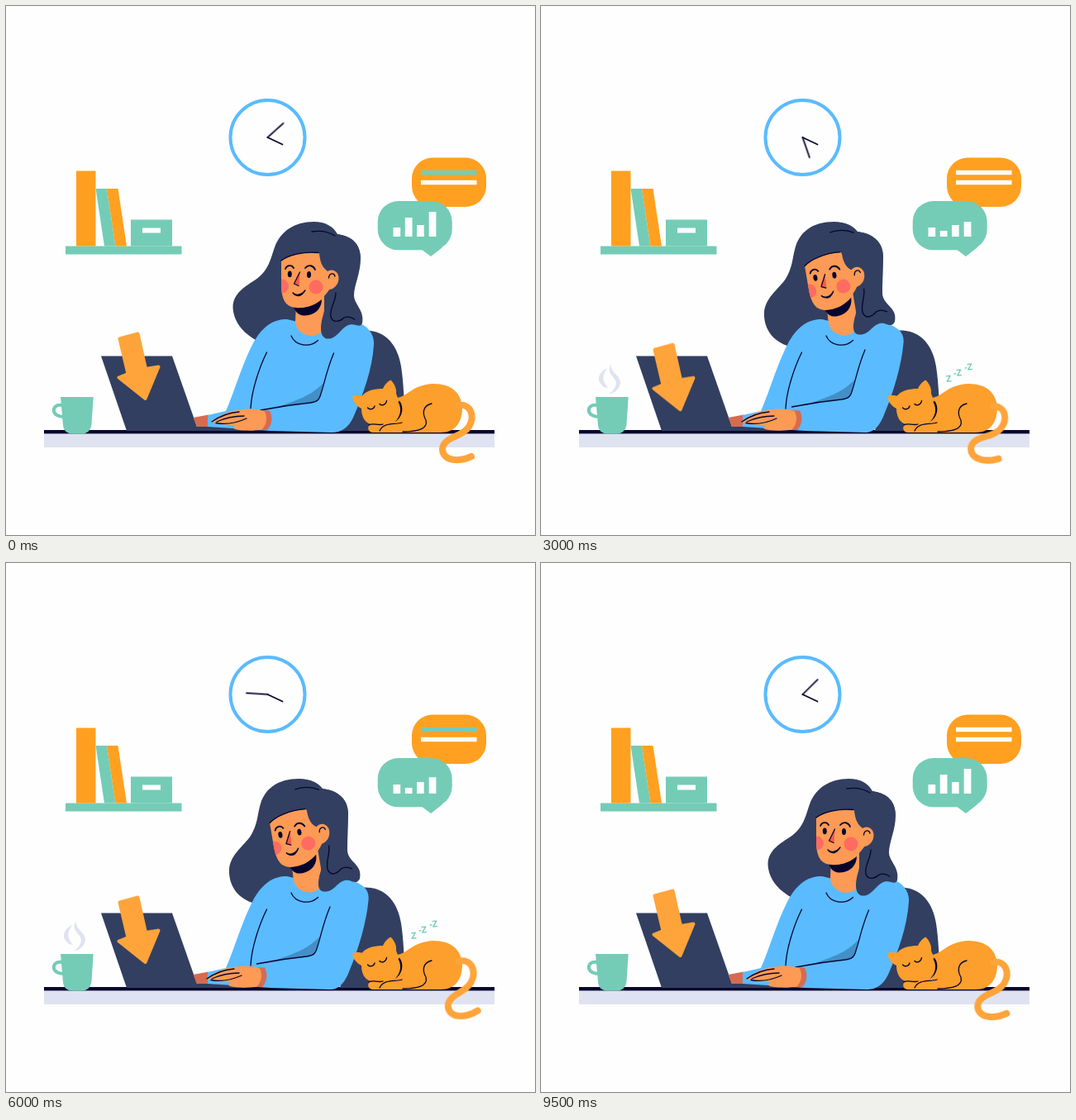
Animation of 640x640 px, one loop 9570 ms. Source, as an HTML page:

```html
<!DOCTYPE html>
<html lang="en">
<head>
<meta charset="utf-8">
<title>Working at a desk</title>
<style>
@property --lean { syntax: "<number>"; inherits: true; initial-value: 0; }

:root {
  --loop: 9570ms;
  --half: 4785ms;
  --ink: #06052f;
  --navy: #323f61;
  --blue: #5abbff;
  --green: #74ccb6;
  --orange: #ffa020;
  --amber: #ffa43b;
  --skin: #fd9a55;
  --shade: #d66b50;
  --blush: #ff6b60;
  --mist: #dfe3f1;
}
html, body { margin: 0; width: 100%; height: 100%; overflow: hidden; background: #fefefe; }
svg { display: block; width: 100%; height: 100%; animation: lean var(--loop) infinite; }

.ink { fill: var(--ink); }
.navy { fill: var(--navy); }
.blue { fill: var(--blue); }
.green { fill: var(--green); }
.orange { fill: var(--orange); }
.skin { fill: var(--skin); }
.shade { fill: var(--shade); }
.blush { fill: var(--blush); }
.mist { fill: var(--mist); }
.white { fill: #fefefe; }
.line { fill: none; stroke: var(--ink); stroke-width: 1.3; stroke-linecap: round; stroke-linejoin: round; }
.thick { stroke-width: 1.8; }

/* --lean: 0 sits back, 1 leans to the screen */
@keyframes lean {
  0% { --lean: 0; animation-timing-function: ease-in-out; }
  18%, 62.4% { --lean: 1; animation-timing-function: ease-in-out; }
  100% { --lean: 0; }
}
.head { transform-origin: 365px 395px; transform: rotate(calc(var(--lean) * -9.5deg)); }
.hand { transform: translateX(calc(var(--lean) * -6px)); }
.elbow { transform: translate(calc(var(--lean) * -4.5px), calc(var(--lean) * -4px)); }

.morph { animation: var(--loop) infinite ease-in-out; }
.torso { animation-name: torso; }
.hair { animation-name: hair; }
.lock { animation-name: lock; }
@keyframes torso {
  0%, 100% { d: path("M244 495L266 490C276 468 286 432 300 406C312 386 324 379 340 379L386 390C396 388 412 380 424 382C438 387 446 397 445 410C443 440 432 470 420 498C414 510 406 516 394 516L320 514L244 509Z"); }
  18%, 62.4% { d: path("M244 495L266 490C276 468 286 432 300 406C312 386 324 379 340 379L386 390C396 388 408 380 418 384C433 389 440 396 438.5 408C436 436 426 468 416 492C410 508 403 516 392 516L320 514L244 509Z"); }
}
@keyframes hair {
  0%, 100% { d: path("M304 405C287 396 275 382 274.5 364C275 347 290 339 302 331C318 320 320 306 325 292C332 272 350 261 372 261C387 261 396 267 401 276C421 279 429 290 429 306L390 380L340 400Z"); }
  18%, 62.4% { d: path("M301 412C280 406 269 390 270 370C272 352 288 342 296 330C305 315 304 304 308 291C314 272 330 261 354 261C369 261 378 266 383 273C405 276 414 288 414 304L386 375L340 400Z"); }
}
@keyframes lock {
  0%, 100% { d: path("M376 285L379 299C380 312 384 318 391 322L393 343C386 352 387 362 384 373C380 386 379 400 388 402.5C401 404 405 388 416 385.5C423 384 428 390 431 384C434 368 421 361 421 350C421 338 429 323 429 306C429 290 421 279 401 276Z"); }
  18%, 62.4% { d: path("M360 288L364 300C366 313 371 318 379 321L386 340C383 350 383 362 381 372C377 385 376 396 384 397.5C397 399 400 386 410 384C418 382 423 391 428 382C432 364 413 362 413 347C413 332 414 320 414 304C414 288 405 276 383 273Z"); }
}

.mouth { stroke: var(--ink); stroke-width: 1.4; stroke-linejoin: round; animation: mouth var(--loop) infinite ease-in-out; }
@keyframes mouth {
  0%, 62%, 97%, 100% { d: path("M347 347C350 351 358 350 362 344C358 350.5 355 351 353 350.5C350 350 348 348.5 347 347Z"); }
  68%, 88% { d: path("M346 348C352 350 358 348 361.5 344C361 351 357 356 353 356C349 355 347 352 346 348Z"); }
}

.minute { transform-origin: 316.5px 159px; animation: minute var(--loop) infinite linear; }
@keyframes minute { from { transform: rotate(48deg); } to { transform: rotate(408deg); } }

.arrow { fill: var(--amber); stroke: var(--amber); stroke-width: 4; stroke-linejoin: round; animation: bob var(--half) infinite cubic-bezier(.37, 0, .63, 1); }
@keyframes bob { 50% { transform: translateY(15.6px); } }

.tail { fill: none; stroke: var(--amber); stroke-width: 8; stroke-linecap: round; transform-origin: 539px 481px; animation: sway var(--loop) infinite linear; }
@keyframes sway {
  0%, 100% { transform: rotate(0); }
  22% { transform: rotate(11deg); }
  40.3% { transform: rotate(5.5deg); }
  53% { transform: rotate(-2deg); }
  62.7% { transform: rotate(-7deg); }
  73% { transform: rotate(-11deg); }
  85% { transform: rotate(-6deg); }
}

.row { animation: var(--half) infinite step-end; }
.row1 { animation-name: row1; }
.row2 { animation-name: row2; }
@keyframes row1 { 0% { fill: var(--green); } 27%, 100% { fill: #fefefe; } }
@keyframes row2 { 0%, 54%, 100% { fill: #fefefe; } 27% { fill: var(--green); } }

.bar { transform-origin: 0 279px; animation: var(--loop) infinite ease-in-out; }
.bar2 { animation-name: bar2; }
.bar4 { animation-name: bar4; }
@keyframes bar2 { 0%, 15%, 76%, 100% { transform: none; } 26%, 65% { transform: scaleY(.304); } }
@keyframes bar4 { 0%, 10%, 70%, 100% { transform: none; } 20%, 60% { transform: scaleY(.6); } }

.rise { animation: rise var(--half) infinite ease-in-out; }
@keyframes rise {
  0% { transform: translateY(40px); }
  27%, 76% { transform: none; }
  98%, 100% { transform: translateY(-40px); }
}
.pass { animation: pass var(--half) infinite linear; }
@keyframes pass {
  0%, 8% { transform: translateX(-40px); }
  29%, 68% { transform: none; }
  89%, 100% { transform: translateX(40px); }
}
.snore { font: 700 11px "Open Sans", Inter, sans-serif; }
</style>
</head>
<body>
<svg viewBox="0 0 640 640">
  <defs>
    <clipPath id="steam"><rect class="rise" x="60" y="431" width="50" height="40"/></clipPath>
    <clipPath id="snore"><rect class="pass" x="488" y="420" width="40" height="45"/></clipPath>
    <clipPath id="face"><path d="M333 308C345 300 362 297 379 299L392 342C386 351 378 359 368 362C356 367 345 366 339 360C334 354 333 345 333 335Z"/></clipPath>
  </defs>

  <!-- clock -->
  <circle cx="316.5" cy="159" r="45" fill="#fefefe" stroke="#5abbff" stroke-width="4"/>
  <path class="line thick" d="M316.500 159L334.500 167.500"/>
  <path class="line thick minute" d="M316.500 159V133.500"/>

  <!-- shelf -->
  <rect class="green" x="72" y="290.5" width="140.5" height="10"/>
  <rect class="orange" x="85" y="199.5" width="23.5" height="91"/>
  <path class="green" d="M108.500 221H122L132.500 290.500H119Z"/>
  <path class="orange" d="M122 221H135.500L146 290.500H132.500Z"/>
  <rect class="green" x="151" y="258.5" width="50" height="32"/>
  <rect class="white" x="165" y="268.5" width="22" height="6"/>

  <!-- chat bubbles -->
  <rect class="orange" x="491" y="183.600" width="90" height="59.400" rx="25"/>
  <rect class="row row1 white" x="502" y="198.8" width="67.5" height="5.4"/>
  <rect class="row row2 white" x="502" y="210.8" width="67.5" height="5.4"/>
  <rect class="green" x="449.7" y="236" width="90" height="59.3" rx="25"/>
  <path class="green" d="M502 294L514 303L528 292L520 285Z"/>
  <g class="white">
    <rect x="468.5" y="268" width="8.7" height="11"/>
    <rect class="bar bar2" x="482.8" y="256" width="8.7" height="23"/>
    <rect x="497" y="265" width="8.7" height="14"/>
    <rect class="bar bar4" x="511.7" y="249" width="8.7" height="30"/>
  </g>

  <!-- desk -->
  <rect class="mist" x="46" y="516" width="545" height="18"/>
  <rect class="ink" x="46" y="513" width="545" height="4.4"/>

  <path class="navy" d="M428 393C458 389 474 410 478 436C481 455 482 480 483 514H404Z"/>
  <path class="morph hair navy" d="M304 405C287 396 275 382 274.500 364C275 347 290 339 302 331C318 320 320 306 325 292C332 272 350 261 372 261C387 261 396 267 401 276C421 279 429 290 429 306L390 380L340 400Z"/>

  <!-- laptop and far hand -->
  <path class="navy" d="M115 423.500H201L231 509H290V514H146Z"/>
  <path class="shade" d="M226.500 498L245 494.500L247 509H231Z"/>

  <!-- torso -->
  <path class="morph torso blue" d="M244 495L266 490C276 468 286 432 300 406C312 386 324 379 340 379L386 390C396 388 412 380 424 382C438 387 446 397 445 410C443 440 432 470 420 498C414 510 406 516 394 516L320 514L244 509Z"/>
  <path class="line" d="M315.500 419C306 438 297 466 296 487"/>
  <path class="line" d="M345 399C350 411 367 414 377.500 404.500"/>
  <g class="elbow">
    <path fill="#438fc6" d="M330 485C350 477 368 473 384 456L380 470C378 478 374 479 366 480Z"/>
    <path class="line" d="M396.500 420C388 440 386 454 381 469C379 477 376 479 368 480C348 482 328 485 308 489"/>
  </g>

  <!-- near hand -->
  <g class="hand">
    <path class="shade" d="M305 489L319 489.500C323 497 322 507 316 513H302Z"/>
    <path class="skin" d="M249 503C259 495 268 490 284 488.500C295 486.500 307 488 313 490.500C317 499 315 507 309 513C297 514 284 514 277 512C274 510.500 275 508 279 507.500C269 507 259 506 253 504.500Z"/>
    <path class="line" d="M249 503C259 496 268 492 282 491M255 503C266 498 278 496 288 496M254 504.500C268 507 280 504 291 499"/>
  </g>

  <!-- head -->
  <g class="head">
    <path class="skin" d="M351 360L350 381C350 391 359 398 368 399C377 399 383 395 385 388L385 350Z"/>
    <path class="ink" d="M348 364C361 367 372 363 382 355C382 366 374 374 362 374.500C355 374.500 351 372 348 364Z"/>
    <path class="skin" d="M333 308C345 300 362 297 379 299L392 323V342C386 351 378 359 368 362C356 367 345 366 339 360C334 354 333 345 333 335Z"/>
    <g class="blush" clip-path="url(#face)">
      <circle cx="333.500" cy="339" r="8.500"/>
      <circle cx="375" cy="340" r="8.500"/>
    </g>
  </g>
  <path class="morph lock navy" d="M376 285L379 299C380 312 384 318 391 322L393 343C386 352 387 362 384 373C380 386 379 400 388 402.500C401 404 405 388 416 385.500C423 384 428 390 431 384C434 368 421 361 421 350C421 338 429 323 429 306C429 290 421 279 401 276Z"/>
  <g class="head">
    <path class="skin" d="M387 323C392 317 401 319 402.500 328C403 338 395 345 386 343Z"/>
    <path class="line" d="M390.500 329C391 323 397 322 398 327M333 308C342 301 359 297 378 298.500M370 273C380 271.500 390 273 398 278"/>
    <path class="line" d="M399 347C399 358 391 366 393 376C396 385 405 381 409 377C414 375 419 377 422 379"/>
    <path class="line thick" d="M338 318C340 313 346 313 348 317M362 317C366 312 372 314 374 319"/>
    <ellipse class="ink" cx="343.300" cy="324.300" rx="2.500" ry="3.900"/>
    <ellipse class="ink" cx="366.500" cy="325" rx="2.500" ry="3.900"/>
    <path fill="#f7584c" d="M355.500 322L349 336L354.500 339Z"/>
    <path class="line" d="M355.500 322L348.500 336L354 338.500"/>
    <path class="mouth ink" d="M347 347C350 351 358 350 362 344C358 350.500 355 351 353 350.500C350 350 348 348.500 347 347Z"/>
  </g>

  <path class="arrow" d="M137.500 402.500L159.500 396.500L169 439L184.500 436.500L168.500 475L136.500 449.500L147.500 445Z"/>

  <!-- mug -->
  <path class="green" d="M66 473H105.700L103.500 506C103 513 98 517.500 92 517.500H81C73 517.500 69.500 513 69 507Z"/>
  <path fill="none" stroke="#74ccb6" stroke-width="4" d="M68 483C60 482 57 486 58 491C60 496 65 497 71 497"/>
  <g class="mist" clip-path="url(#steam)">
    <path d="M80.500 438C70 442 67 452 73 458C75 461 79 462 81 462C77 457 74 452 76 446C77 442 79 440 80.500 438Z"/>
    <path d="M85 433C83 443 96 446 96 456C95 464 89 468 82 469.500C88 465 92 460 90.500 454C89 448 78 444 85 433Z"/>
  </g>

  <!-- cat -->
  <path fill="#fc9f2c" d="M419 472.500C423 470 428 471.500 431 471.500C436 465 446 463 456 463C458 458 462 454 465.500 452.500C469 456 473 462 472 469L474 474C487 471 493 458 517 457C539 457 551 468 552 486C552 503 544 516 526 516H443C437 515 437 508 441 506C435 504 430 498 430 487C424 484 420 479 419 472.500Z"/>
  <path class="ink" d="M476 477.500C482 485 480 498 470 503.500C477 497 479.500 488 474.500 479Z"/>
  <path class="line" d="M437.500 486C440 489 445 488 446 484M452 481.500C455 484.500 460 482 460.500 477.500"/>
  <path class="line" d="M439 507C444 504 450 508 456 506M452 514C457 503 470 507 479 504M515 481C503 484 504 494 508 501C511 512 497 515 480 515"/>
  <path class="tail" d="M548 483C562 481 568 496 560 509C552 522 529 521 528 536C528 549 545 553 563 545"/>
  <g clip-path="url(#snore)">
    <g class="snore green">
      <text transform="translate(490.500 455) rotate(-6)">Z</text>
      <text transform="translate(499.500 448) rotate(-6)">-Z</text>
      <text transform="translate(512.500 441) rotate(-6)">-Z</text>
    </g>
  </g>
</svg>
</body>
</html>
```
